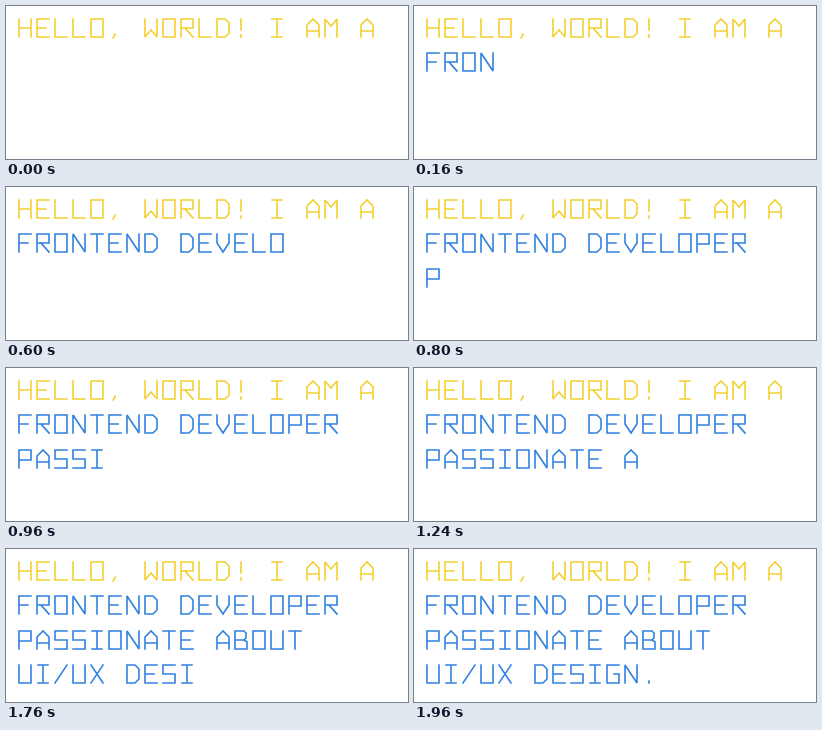
These frames come from a looping animation (402x153 px, 3460 ms). An HTML page:

```html
<!DOCTYPE html>
<html lang="en">
<head>
<meta charset="utf-8">
<title>Typed introduction</title>
<style>
  html, body { margin: 0; width: 100%; height: 100%; overflow: hidden; background: #fff; }
  svg { display: block; width: 402px; height: 153px; }
  path { fill: none; stroke-width: 1.6; stroke-linecap: square; stroke-linejoin: miter; stroke-miterlimit: 2; }
</style>
</head>
<body>
<svg id="stage" viewBox="0 0 402 153" role="img"></svg>
<script>
// Single-stroke letters in a cell 14 wide and 20 high.
const GLYPHS = {
  A: 'M1 19V7L7 1L13 7V19M1 13H13',
  B: 'M1 1H10L12 3V8L10 10H1M10 10L13 12V19H1V1',
  D: 'M1 1H9L13 5V15L9 19H1Z',
  E: 'M13 1H1V19H13M1 10H10',
  F: 'M13 1H1V19M1 10H10',
  G: 'M13 1H1V19H13V10H8',
  H: 'M1 1V19M13 1V19M1 10H13',
  I: 'M2 1H12M7 1V19M2 19H12',
  L: 'M1 1V19H13',
  M: 'M1 19V1L7 8L13 1V19',
  N: 'M1 19V1L13 19V1',
  O: 'M1 1H13V19H1Z',
  P: 'M1 19V1H13V11H1',
  R: 'M1 19V1H13V10H1M5 10L13 19',
  S: 'M13 1H1V10H13V19H1',
  T: 'M1 1H13M7 1V19',
  U: 'M1 1V19H13V1',
  V: 'M1 1V10L7 19L13 10V1',
  W: 'M1 1V19L7 12L13 19V1',
  X: 'M1 1L13 19M13 1L1 19',
  '/': 'M1 19L13 1',
  ',': 'M7 16V17L5 20',
  '.': 'M7 17V19',
  '!': 'M7 1V12M7 17V19'
};

const INTRO = 'HELLO, WORLD! I AM A';
const TYPED = 'FRONTEND DEVELOPER\nPASSIONATE ABOUT\nUI/UX DESIGN.';
const LINE_TOPS = [12, 46, 81, 115];
const LEFT = 12, PITCH = 18;
const STEP = 40, LOOP = 3460;
const SKIP_AT = 1280, SKIPPED = 2;

const stage = document.getElementById('stage');
stage.setAttribute('aria-label', INTRO + ' ' + TYPED.replace(/\n/g, ' '));

// Returns one entry per character; blanks have no path.
function layText(text, firstLine, color) {
  let line = firstLine, column = 0;
  return [...text].map(char => {
    if (char === '\n') {
      line++;
      column = 0;
      return null;
    }
    const x = LEFT + PITCH * column++;
    if (!GLYPHS[char]) return null;
    const path = document.createElementNS('http://www.w3.org/2000/svg', 'path');
    path.setAttribute('d', GLYPHS[char]);
    path.setAttribute('transform', `translate(${x} ${LINE_TOPS[line]})`);
    path.setAttribute('stroke', color);
    stage.append(path);
    return path;
  });
}

layText(INTRO, 0, '#f3cf2e');
const typed = layText(TYPED, 1, '#2f80e0');

function draw(time) {
  const count = Math.floor(time / STEP) + (time >= SKIP_AT ? SKIPPED : 0);
  typed.forEach((path, i) => {
    if (path) path.style.visibility = i < count ? 'visible' : 'hidden';
  });
}

const start = performance.now();
function tick() {
  draw((performance.now() - start) % LOOP);
  requestAnimationFrame(tick);
}
tick();
</script>
</body>
</html>
```
